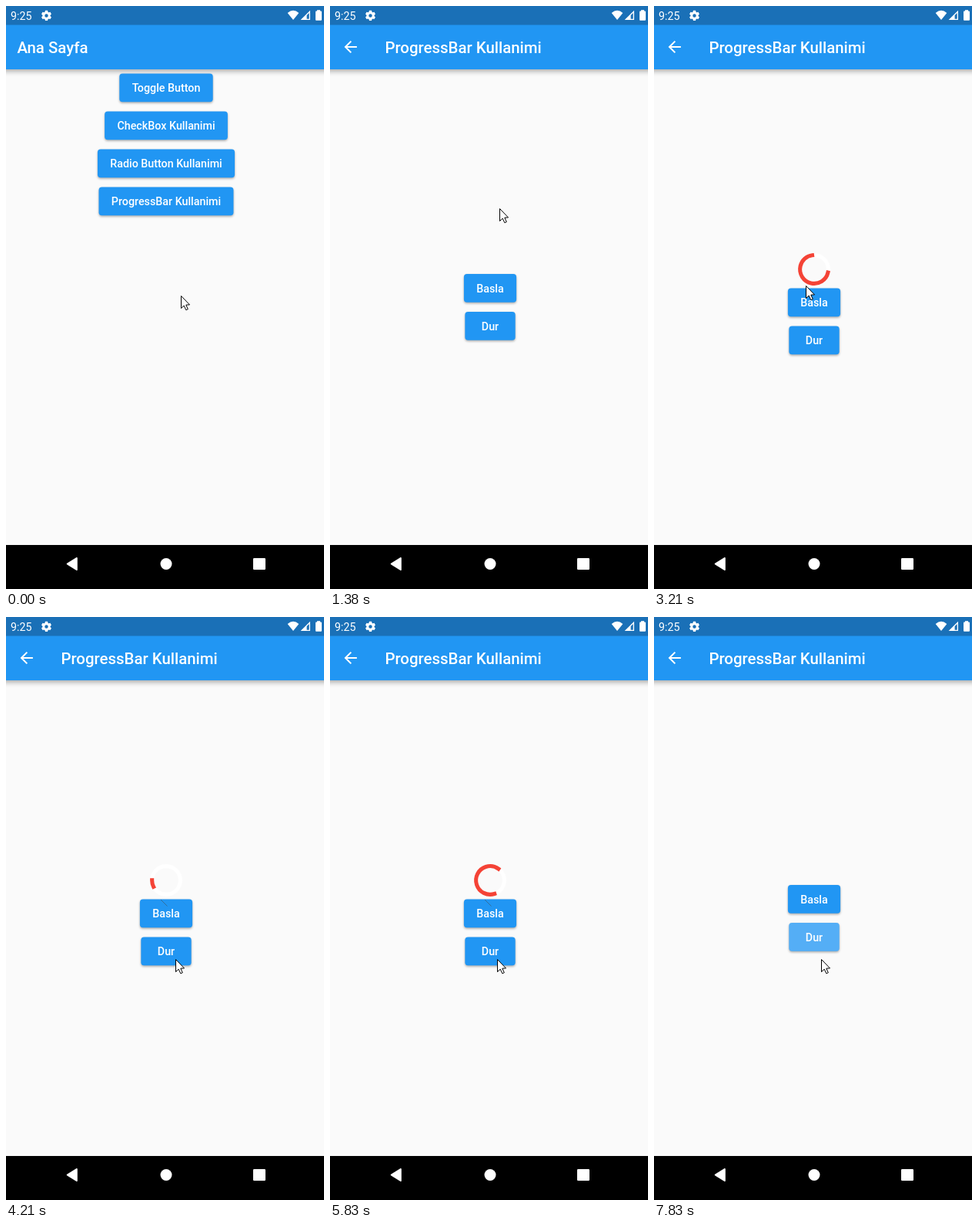
Animation, 413 px wide and 755 px high, one loop 8 s. Source, as an HTML page with a canvas:

```html
<!DOCTYPE html>
<html lang="tr">
<head>
<meta charset="utf-8">
<title>ProgressBar Kullanimi</title>
<style>
  html, body { margin: 0; width: 100%; height: 100%; overflow: hidden; background: #fafafa; }
  canvas { display: block; width: 413px; height: 755px; }
</style>
</head>
<body>
<canvas id="stage"></canvas>
<script>
const W = 413, H = 755, LOOP = 8000, MID = 208;
const DP = 1.0208; // pixels per layout unit
const BLUE = '#2196f3', STATUS = '#1a70b7', RED = '#f44336', WHITE = '#fff';
const MENU = ['Toggle Button', 'CheckBox Kullanimi', 'Radio Button Kullanimi', 'ProgressBar Kullanimi'];

// The screen is sampled at a fixed rate and holds in between.
const TICK = 200.8, LEAD = 28;
const OPEN_PRESS = 980, PAGE_AT = 1380, SPIN_AT = 2790, SPIN_START = 2765, STOP_PRESS = 7630, STOP_AT = 7830;

const canvas = document.getElementById('stage');
const ctx = canvas.getContext('2d');
const dpr = window.devicePixelRatio || 1;
canvas.width = W * dpr;
canvas.height = H * dpr;

const rad = deg => deg * Math.PI / 180;
const clamp = v => Math.min(1, Math.max(0, v));
const veil = alpha => `rgba(255,255,255,${alpha})`;

// cubic-bezier(.4, 0, .2, 1)
function ease(x) {
  x = clamp(x);
  let lo = 0, hi = 1, s = 0.5;
  for (let i = 0; i < 24; i++) {
    s = (lo + hi) / 2;
    const v = 1.2 * s * (1 - s) ** 2 + 0.6 * s * s * (1 - s) + s ** 3;
    if (v < x) lo = s; else hi = s;
  }
  return 3 * s * s * (1 - s) + s ** 3;
}

function poly(points, fill) {
  ctx.beginPath();
  points.forEach(([x, y]) => ctx.lineTo(x, y));
  ctx.closePath();
  ctx.fillStyle = fill;
  ctx.fill();
}

function disc(x, y, r, fill) {
  ctx.beginPath();
  ctx.arc(x, y, r, 0, 7);
  ctx.fillStyle = fill;
  ctx.fill();
}

function rect(x, y, w, h, fill, r = 0) {
  ctx.beginPath();
  ctx.roundRect(x, y, w, h, r);
  ctx.fillStyle = fill;
  ctx.fill();
}

function stroke(color, width) {
  ctx.strokeStyle = color;
  ctx.lineWidth = width;
  ctx.stroke();
}

function setFont(size, weight) {
  ctx.font = `${weight} ${size * DP}px Roboto, sans-serif`;
}

function label(text, x, y, align = 'left') {
  ctx.textAlign = align;
  ctx.fillStyle = WHITE;
  ctx.fillText(text, x, y);
}

function withShadow(dy, blur, alpha, paint) {
  ctx.save();
  ctx.shadowColor = `rgba(0,0,0,${alpha})`;
  ctx.shadowOffsetY = dy * dpr;
  ctx.shadowBlur = blur * dpr;
  paint();
  ctx.restore();
}

// press: { glow, x, y, r } – overall tint plus an optional ripple clipped to the button
function button(text, top, press) {
  setFont(14, 500);
  const h = 36 * DP;
  const w = Math.max(64, ctx.measureText(text).width / DP + 32) * DP;
  const x = MID - w / 2;
  withShadow(1.5, 3, 0.32, () => rect(x, top, w, h, BLUE, 4));
  if (press) {
    ctx.save();
    rect(x, top, w, h, veil(press.glow), 4);
    ctx.clip();
    if (press.r) disc(press.x, press.y, press.r, veil(0.15));
    ctx.restore();
  }
  label(text, MID, top + h / 2 + 5.3, 'center');
}

function gear(x, y) {
  ctx.save();
  ctx.translate(x, y);
  for (let i = 0; i < 6; i++) {
    poly([[-2.3, -3.5], [-1.5, -6.6], [1.5, -6.6], [2.3, -3.5]], WHITE);
    ctx.rotate(rad(60));
  }
  ctx.beginPath();
  ctx.arc(0, 0, 3.6, 0, 7);
  stroke(WHITE, 2.7);
  ctx.restore();
}

function statusBar() {
  rect(0, 0, W, 24.4, STATUS);
  setFont(14, 400);
  label('9:25', 6, 18);
  gear(52.5, 12.4);
  ctx.beginPath();
  ctx.moveTo(373, 18);
  ctx.lineTo(365.7, 9);
  ctx.quadraticCurveTo(373, 2.6, 380.3, 9);
  ctx.fillStyle = WHITE;
  ctx.fill();
  poly([[382.6, 18], [395, 5.8], [395, 18]], WHITE);
  poly([[390.6, 12], [393.7, 9], [393.7, 16.7], [390.6, 16.7]], STATUS);
  rect(402, 6.5, 8, 12.2, WHITE, 1);
  rect(404, 5.2, 4, 2, WHITE);
}

function appBar(title, x) {
  withShadow(3, 6, 0.3, () => rect(-10, 24, W + 20, 58, BLUE));
  setFont(20, 500);
  label(title, x, 61);
}

function backArrow(x, y) {
  ctx.beginPath();
  ctx.moveTo(x + 8.2, y);
  ctx.lineTo(x - 6.6, y);
  ctx.moveTo(x + 0.7, y - 7.4);
  ctx.lineTo(x - 6.7, y);
  ctx.lineTo(x + 0.7, y + 7.4);
  stroke(WHITE, 2 * DP);
}

function navBar() {
  rect(0, 698, W, H - 698, '#000');
  ctx.lineJoin = 'round';
  poly([[79.5, 722.5], [92, 714.8], [92, 730.2]], WHITE);
  stroke(WHITE, 1.6);
  ctx.lineJoin = 'miter';
  disc(MID, 722.5, 7.5, WHITE);
  rect(321, 715, 16, 15, WHITE, 1.2);
}

function spinner(ms) {
  const phase = ms / 1333 % 1, turn = ms / 2222 % 1;
  const head = ease(phase * 2), tail = ease(phase * 2 - 1);
  const start = -90 + tail * 270 + turn * 360 + phase * 90;
  const ring = (from, sweep, color) => {
    ctx.beginPath();
    ctx.arc(MID, 341, 18 * DP, rad(from), rad(from + sweep));
    stroke(color, 5 * DP);
  };
  ring(0, 360, WHITE);
  ctx.lineCap = 'square';
  ring(start, Math.max((head - tail) * 270, 0.1), RED);
  ctx.lineCap = 'butt';
}

// Glides from rest to rest; each move adds its offset as it plays.
function pointerAt(t) {
  let x = 227, y = 375;
  const glide = (from, to, dx, dy) => {
    const k = ease(clamp((t - from) / (to - from)));
    x += dx * k;
    y += dy * k;
  };
  glide(0, 600, -7, -113);
  glide(2000, 2400, -23, 100);
  glide(3220, 3810, 39, 56);
  glide(3820, 4210, -16, 25);
  glide(4300, 4800, -3, 0);
  return [x, y];
}

function pointer(x, y) {
  ctx.save();
  ctx.translate(Math.round(x) + 0.5, Math.round(y) + 0.5);
  poly([[0, 0], [0, 16], [3.7, 12.6], [6.3, 18.2], [8.8, 17.1], [6.3, 11.6], [11, 11.4]], WHITE);
  stroke('#000', 1);
  ctx.restore();
}

function homePage(t) {
  appBar('Ana Sayfa', 14.4);
  const held = t - OPEN_PRESS;
  const press = held >= 0 && { glow: 0.06, x: 220, y: 263.5, r: Math.min(29, 12 + held * 0.08) };
  MENU.forEach((text, i) => button(text, 87.6 + i * 48 * DP, i === 3 && press));
}

function progressPage(t) {
  appBar('ProgressBar Kullanimi', 71.5);
  backArrow(26.7, 53);
  const spinning = t >= SPIN_AT && t < STOP_AT;
  const top = 347.1 + (spinning ? 18 * DP : 0);
  const startPress = spinning && t < SPIN_AT + TICK && { glow: 0.2 };
  let stopPress = null;
  if (t >= STOP_AT) stopPress = { glow: 0.23 };
  else if (t >= STOP_PRESS) stopPress = { glow: 0.04, x: 217, y: 443, r: 16 };

  if (spinning) spinner(t - SPIN_START);
  button('Basla', top, startPress);
  button('Dur', top + 48 * DP, stopPress);

  // faint trail left where the pointer rested
  if (spinning && t > 3400) {
    ctx.beginPath();
    ctx.moveTo(201, 366);
    ctx.lineTo(209.5, 374.5);
    stroke('rgba(70,70,70,.5)', 1);
  }
}

function draw(t) {
  ctx.setTransform(dpr, 0, 0, dpr, 0, 0);
  rect(0, 0, W, H, '#fafafa');
  if (t < PAGE_AT) homePage(t); else progressPage(t);
  statusBar();
  navBar();
  pointer(...pointerAt(t));
}

const origin = performance.now();
function frame() {
  const t = Math.max(0, performance.now() - origin) % LOOP;
  draw(Math.floor((t + LEAD) / TICK) * TICK);
  requestAnimationFrame(frame);
}
frame();
</script>
</body>
</html>
```
